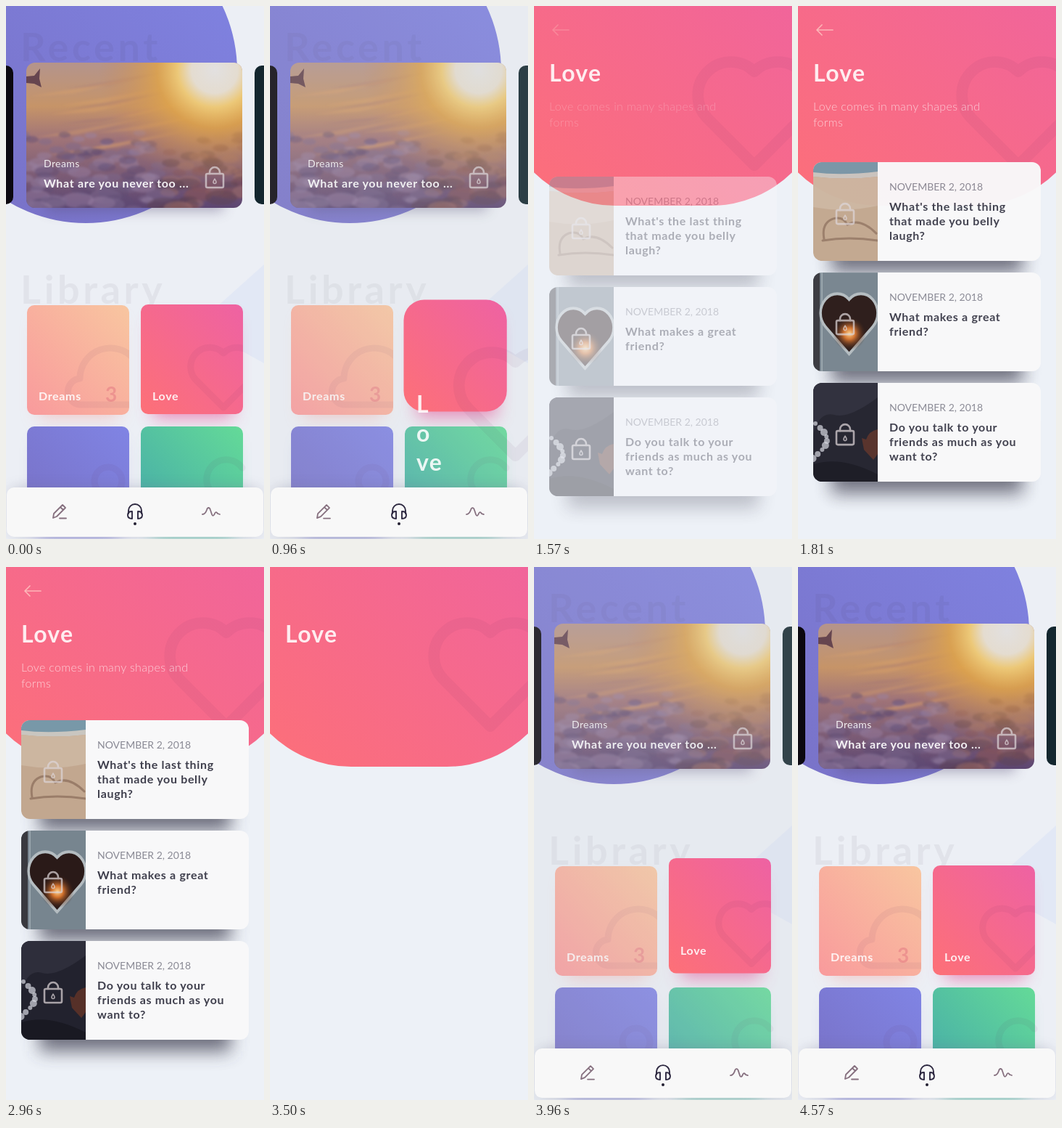
An HTML page that plays this animation: 356x734 px, repeating every 5040 ms.

```html
<!DOCTYPE html>
<html lang="en">
<head>
<meta charset="utf-8">
<title>Journal</title>
<style>
html, body { margin: 0; width: 100%; height: 100%; overflow: hidden; background: #eceff5; }
svg.stage { display: block; width: 100vw; height: 100vh; }
text { font-family: Lato, "Open Sans", sans-serif; fill: #fff; white-space: pre; }
.b { font-weight: 700; letter-spacing: .042em; }
.ghost { font-size: 54px; letter-spacing: .085em; fill: #3c3246; opacity: .06; }
.label { font-size: 16px; opacity: .87; }
.count { font-size: 28px; fill: #dc6478; opacity: .38; }
.date { font-size: 14px; fill: #8a8a95; }
.head { font-size: 16px; fill: #3e3e4c; }
.intro { font-size: 16px; font-weight: 300; letter-spacing: .022em; opacity: .68; }
.line { fill: none; stroke-linecap: round; stroke-linejoin: round; }
.mark { stroke: #5a2850; stroke-width: 9; opacity: .06; }
</style>
</head>
<body>
<svg class="stage" viewBox="0 0 356 734">
  <defs>
    <linearGradient id="peach" x1="0" y1="1" x2="1" y2="0"><stop stop-color="#f99a9c"/><stop offset="1" stop-color="#f8c6a0"/></linearGradient>
    <linearGradient id="rose" x1="0" y1="1" x2="1" y2="0"><stop stop-color="#fd7077"/><stop offset="1" stop-color="#ee62a3"/></linearGradient>
    <linearGradient id="violet" x1="0" y1="1" x2="1" y2="0"><stop stop-color="#7870c4"/><stop offset="1" stop-color="#8084e4"/></linearGradient>
    <linearGradient id="mint" x1="0" y1="1" x2="1" y2="0"><stop stop-color="#44a8aa"/><stop offset="1" stop-color="#64da98"/></linearGradient>
    <linearGradient id="sky" x1="0" y1="0" x2="0" y2="1">
      <stop stop-color="#b4948c"/><stop offset=".3" stop-color="#c69468"/>
      <stop offset=".52" stop-color="#a07478"/><stop offset="1" stop-color="#5c4672"/>
    </linearGradient>
    <radialGradient id="sun" gradientUnits="userSpaceOnUse" cx="288" cy="88" r="160">
      <stop stop-color="#e2e0e0"/><stop offset=".2" stop-color="#e4dcd0"/><stop offset=".32" stop-color="#ecc878"/>
      <stop offset=".5" stop-color="#e0a448" stop-opacity=".8"/><stop offset="1" stop-color="#c88858" stop-opacity="0"/>
    </radialGradient>
    <radialGradient id="glow"><stop stop-color="#ffd08a"/><stop offset=".35" stop-color="#d0702c"/><stop offset="1" stop-color="#3a1c14" stop-opacity="0"/></radialGradient>
    <filter id="soft1" x="-20%" y="-20%" width="140%" height="140%"><feGaussianBlur stdDeviation="1.6"/></filter>
    <filter id="soft8" x="-40%" y="-80%" width="180%" height="260%"><feGaussianBlur stdDeviation="9"/></filter>
    <filter id="soft12" x="-50%" y="-50%" width="200%" height="200%"><feGaussianBlur stdDeviation="12"/></filter>
    <clipPath id="photoClip"><rect x="28" y="78" width="298" height="200" rx="12"/></clipPath>
    <clipPath id="rowClip"><path d="M110 0H33a12 12 0 0 0-12 12V124a12 12 0 0 0 12 12H110Z"/></clipPath>
    <clipPath id="dreamClip"><rect x="29" y="412" width="141" height="151" rx="10"/></clipPath>
    <clipPath id="heroClip"><rect class="heroBox"/></clipPath>
    <path id="heart" d="M50 88L12.5 50.5A26 26 0 0 1 50 13A26 26 0 0 1 87.5 50.5Z"/>
    <g id="lock" class="line" stroke="#ddd5d8" stroke-width="2.6" opacity=".72">
      <rect x="-12" y="-6" width="24" height="19" rx="2"/>
      <path d="M-7-6V-8a7 7 0 0 1 14 0V-6"/>
      <path d="M0 1C-1 3-2 4-2 5.500a2 2 0 0 0 4 0C2 4 1 3 0 1Z" stroke-width="1.6"/>
    </g>
  </defs>

  <g id="home">
    <rect width="356" height="734" fill="#eceff5"/>
    <path d="M356 356L262 440L356 492Z" fill="#dfe6f5" opacity=".7"/>
    <circle cx="110" cy="90" r="209" fill="url(#violet)"/>
    <text class="b ghost" x="20" y="76">Recent</text>
    <text class="b ghost" x="20" y="410">Library</text>
    <rect x="-20" y="82" width="30" height="191" rx="10" fill="#0c0810"/>
    <rect x="343" y="82" width="30" height="191" rx="10" fill="#13262e"/>
    <rect x="55" y="110" width="245" height="172" fill="#5a5078" opacity=".45" filter="url(#soft8)"/>
    <g clip-path="url(#photoClip)">
      <rect x="28" y="78" width="298" height="200" fill="url(#sky)"/>
      <g filter="url(#soft1)">
        <g id="rays"></g>
        <g id="clouds"></g>
      </g>
      <rect x="28" y="78" width="298" height="200" fill="url(#sun)"/>
      <path d="M28 97L39 96L47 86L46 100L49 112L39 107L28 106Z" fill="#66454f"/>
    </g>
    <text x="52" y="222" font-size="14" letter-spacing=".4" opacity=".88">Dreams</text>
    <text class="b" x="52" y="250" font-size="16" opacity=".93">What are you never too ...</text>
    <use href="#lock" x="288" y="237"/>

    <rect x="45" y="432" width="110" height="134" fill="#f4a8a4" opacity=".6" filter="url(#soft12)"/>
    <rect x="203" y="432" width="110" height="134" fill="#e8589c" opacity=".75" filter="url(#soft12)"/>
    <rect x="45" y="600" width="110" height="134" fill="#7a78d0" opacity=".7" filter="url(#soft12)"/>
    <rect x="203" y="600" width="110" height="134" fill="#55c0a0" opacity=".7" filter="url(#soft12)"/>
    <rect x="29" y="412" width="141" height="151" rx="10" fill="url(#peach)"/>
    <path class="line mark" clip-path="url(#dreamClip)" d="M180 549H105a18 18 0 0 1-3-36a42 42 0 0 1 75-26"/>
    <text class="b label" x="45" y="543">Dreams</text>
    <text class="b count" x="137" y="545">3</text>
    <text class="b count" x="294" y="545">3</text>
    <rect x="29" y="579" width="141" height="151" rx="10" fill="url(#violet)"/>
    <circle class="line mark" cx="141" cy="654" r="19"/>
    <rect x="186" y="579" width="141" height="151" rx="10" fill="url(#mint)"/>
    <path class="line mark" d="M282 668a25 25 0 0 1 44-32"/>
  </g>

  <rect id="veil" width="356" height="734"/>

  <g id="hero">
    <rect class="heroBox" fill="url(#rose)"/>
    <g id="heartWrap"><use id="heroHeart" href="#heart" class="line mark"/></g>
    <text id="title" class="b"></text>
  </g>

  <g id="detail">
    <path class="line" d="M48 33H26M33 26L26 33L33 40" stroke="#ffd0c8" stroke-width="1.7" opacity=".75"/>
    <text class="intro" x="21" y="144">Love comes in many shapes and</text>
    <text class="intro" x="21" y="166">forms</text>
    <g id="rows"></g>
  </g>

  <g id="nav">
    <rect x="6" y="664" width="344" height="64" rx="10" fill="#70708a" opacity=".35" filter="url(#soft8)"/>
    <rect x="1" y="663" width="354" height="68" rx="10" fill="#f8f8f8"/>
    <g class="line" stroke="#86707f" stroke-width="1.8">
      <path d="M65 705L66 699L78 687L82 691L70 703ZM75 690L79 694M74 705.500H83"/>
      <path d="M271 700C274 700 276 697 277 694C278 690 281 690 282 694L284 700C285 703 287 702 288 699C289 696 291 697 292 699L295 700"/>
    </g>
    <g class="line" stroke="#2d2840" stroke-width="1.9">
      <path d="M169 699V695a9 9 0 0 1 18 0V699"/>
      <path d="M174 696V706C170 706 168 704 168 701S170 696 174 696ZM182 696V706C186 706 188 704 188 701S186 696 182 696Z"/>
    </g>
    <circle cx="178" cy="713" r="2" fill="#221e30"/>
  </g>
</svg>

<script>
const LOOP = 5040;
const $ = id => document.getElementById(id);
const clamp = v => Math.min(1, Math.max(0, v));
const mix = (a, b, k) => a + (b - a) * k;
const set = (el, attrs) => { for (const k in attrs) el.setAttribute(k, attrs[k]); };

let seed = 11;
const rnd = () => (seed = seed * 16807 % 2147483647) / 2147483647;

// Sky: slanted light streaks above, cloud tufts growing towards the viewer
let rays = '', clouds = '';
for (let i = 0; i < 12; i++) {
  const y = 88 + i * 8 + rnd() * 8, x = 28 + rnd() * 120;
  rays += `<path d="M${x} ${y + 26}L${x + 150} ${y}L${x + 60} ${y + 22}Z" fill="${i % 3 ? '#e0a468' : '#9c7078'}" opacity=".28"/>`;
}
for (let i = 0; i < 150; i++) {
  const d = i / 150, x = 20 + rnd() * 315, y = 172 + d * 106 + rnd() * 8, r = 6 + d * 13 * rnd();
  const tone = x > 215 ? ['#83525a', '#5c4050', '#a0706a'] : ['#9a82a4', '#5e4c74', '#7c688e'];
  clouds += `<ellipse cx="${x}" cy="${y}" rx="${r * 1.4}" ry="${r * .65}" fill="${tone[i % 3]}" opacity=".45"/>`;
}
$('rays').innerHTML = rays;
$('clouds').innerHTML = clouds;

// Row pictures, drawn in a box 21..110 by 0..136
const beach = `<rect x="21" width="89" height="136" fill="#c2a78f"/>
  <rect x="21" width="89" height="17" fill="#7898a8"/>
  <path d="M21 14Q60 19 110 13V20Q65 25 21 20Z" fill="#c9c6c0"/>
  <path d="M21 20Q65 25 110 20V60Q65 70 21 62Z" fill="#ccb6a0"/>
  <path class="line" d="M36 106Q32 84 48 78Q62 74 68 86Q86 76 108 98M34 108Q70 102 110 108" stroke="#8d6f5c" stroke-width="3" opacity=".75"/>`;
const bokeh = [...Array(9)].map((_, i) =>
  `<circle cx="${24 + 16 * Math.sin(i * .42)}" cy="${56 + i * 6}" r="${3 + i % 3}" fill="#d6d8e0" opacity=".7"/>`).join('');
const metal = `<rect x="21" width="89" height="136" fill="#77858f"/>
  <rect x="21" width="9" height="136" fill="#39393f"/><path d="M33 0V136" stroke="#98a4ac" stroke-width="2"/>
  <use href="#heart" transform="translate(27 24) scale(.87 1)" fill="#2a1a18" stroke="#b4bcc0" stroke-width="4"/>
  <circle cx="71" cy="84" r="23" fill="url(#glow)"/>`;
const night = `<rect x="21" width="89" height="136" fill="#22222e"/>
  <path d="M21 0H110V20Q70 50 50 44T21 70Z" fill="#2e2e3b"/>
  <path d="M110 64Q98 66 94 78L88 76L91 92L104 106L110 98Z" fill="#673426" opacity=".75"/>
  <path d="M21 136V112Q60 100 110 126V136Z" fill="#191922"/>${bokeh}`;

const entries = [
  [beach, "What's the last thing", 'that made you belly', 'laugh?'],
  [metal, 'What makes a great', 'friend?'],
  [night, 'Do you talk to your', 'friends as much as you', 'want to?']
];
$('rows').innerHTML = entries.map(([art, ...lines], i) => `
  <g transform="translate(0 ${211 + i * 152})">
    <rect x="46" y="40" width="264" height="112" fill="#3c3c50" opacity=".72" filter="url(#soft12)"/>
    <rect x="21" width="314" height="136" rx="12" fill="#f8f8f9"/>
    <g clip-path="url(#rowClip)">${art}</g>
    <use href="#lock" x="65" y="72"/>
    <text class="date" x="126" y="39">NOVEMBER 2, 2018</text>
    ${lines.map((s, n) => `<text class="b head" x="126" y="${67 + n * 20}">${s}</text>`).join('')}
  </g>`).join('');

// Cubic curve (.4, 0, .2, 1)
function ease(x) {
  let lo = 0, hi = 1, s = .5;
  for (let i = 0; i < 20; i++) {
    s = (lo + hi) / 2;
    const m = 1 - s;
    if (1.2 * m * m * s + .6 * m * s * s + s * s * s < x) lo = s; else hi = s;
  }
  return s * s * (3 - 2 * s);
}

// The big title wraps while its box is still narrow
const wrap = p => p < .1 ? ['L', 'o', 've'] : p < .6 ? ['Lo', 've'] : p < .95 ? ['Lov', 'e'] : ['Love'];
const boxes = document.querySelectorAll('.heroBox');

function draw(t) {
  const entering = t < 2700;
  const u = clamp(entering ? (t - 925) / 500 : (4005 - t) / 500);
  const shown = clamp(entering ? (t - 1420) / 560 : (3500 - t) / 540);
  const p = ease(u);
  const large = t >= 925 && t < 3505;

  // Going back, the card swings sideways ahead of its fall
  const kx = large ? (p + p * p * (3 - 2 * p)) / 2 : p ** 2.5;
  const kw = large ? p ** 1.25 : p ** 2.65;
  const kh = large ? p : p ** .87;
  const r = large ? 10 + 150 * u ** .8 : 10 + 150 * p ** 8;
  const box = { x: mix(186, -48, kx), y: mix(411, -108, p), width: mix(141, 452, kw), height: mix(151, 383, kh), rx: r };
  boxes.forEach(el => set(el, box));

  const heart = large
    ? `translate(${mix(253, 218, p)} ${mix(473, 68, p)}) scale(1.72)`
    : `translate(250 ${mix(465, 137, p)})`;
  set($('heroHeart'), { transform: heart });
  set($('heartWrap'), { 'clip-path': large ? 'none' : 'url(#heroClip)' });

  const smooth = p * p * p * (p * (p * 6 - 15) + 10);
  const tx = mix(202, 21, large ? smooth : p ** 2.3);
  const ty = large ? mix(566, 104, p) : mix(543, 95, p);
  const lines = large ? wrap(p) : ['Love'];
  set($('title'), { 'font-size': large ? 32 : 16, opacity: .88 });
  $('title').innerHTML = lines.map((s, i) => `<tspan x="${tx}" y="${ty + i * 40}">${s}</tspan>`).join('');

  const a = 1 - (1 - u) ** 2, lift = 34 * a ** 4;
  set($('veil'), { fill: `rgb(${[203, 207, 213].map(v => Math.round(v + lift))})`, opacity: a });
  set($('nav'), { transform: `translate(0 ${175 * u ** 3})` });
  set($('detail'), { opacity: clamp(shown * 1.4) });
  set($('rows'), { transform: `translate(0 ${45 * (1 - shown) ** 2})` });
}

function tick() {
  draw(performance.now() % LOOP);
  requestAnimationFrame(tick);
}
tick();
</script>
</body>
</html>
```
